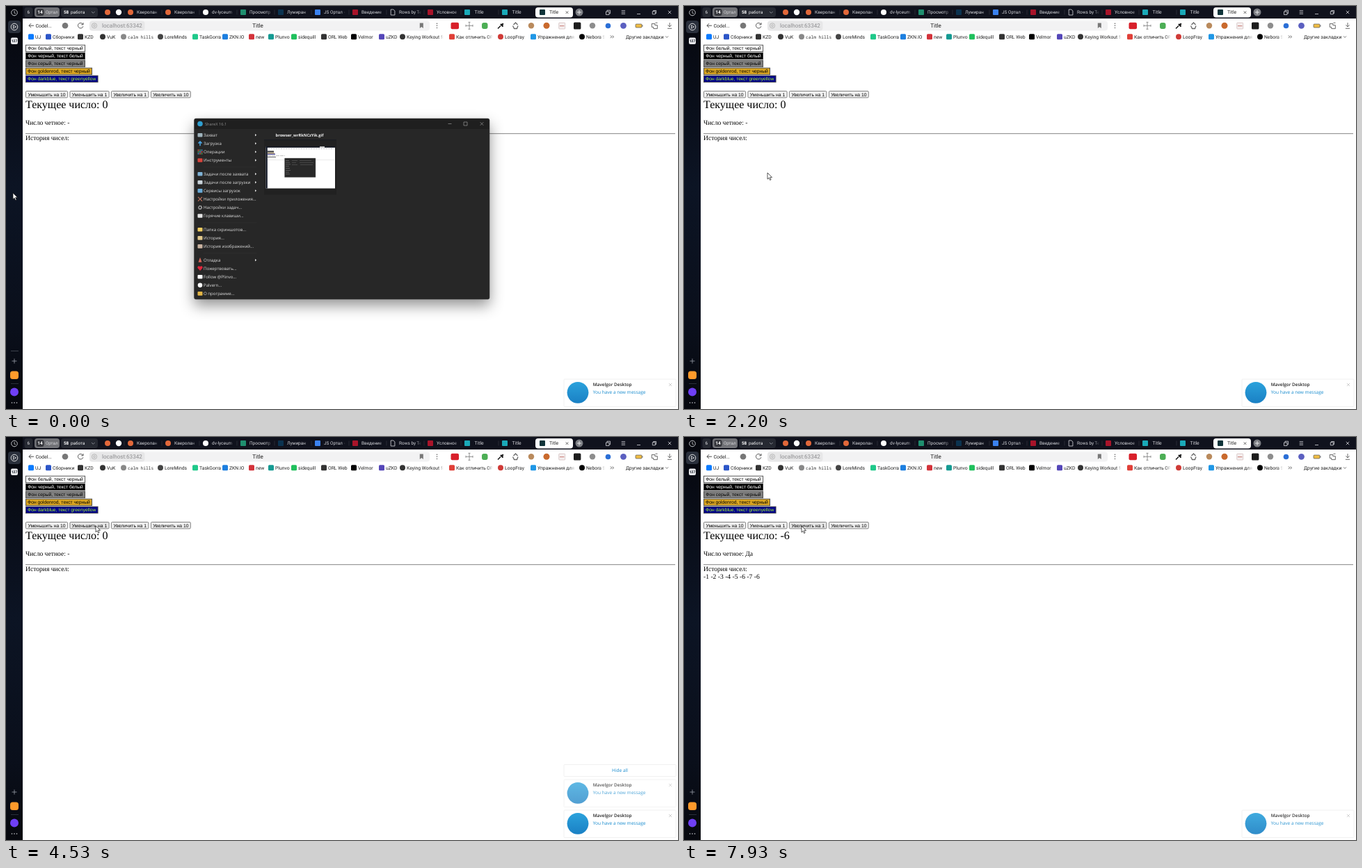
An HTML page that plays this animation: 966 by 580 pixels, repeating every 8 s.

```html
<!DOCTYPE html>
<html lang="ru">
<head>
<meta charset="utf-8">
<title>Title</title>
<style>
html, body { margin: 0; width: 100%; height: 100%; overflow: hidden; background: #fff; }
svg { display: block; width: 100vw; height: 100vh; }
text { text-rendering: geometricPrecision; white-space: pre; }
.ui { font-family: Roboto, sans-serif; }
.os { font-family: "Open Sans", sans-serif; }
.btn { font-family: "Liberation Sans", Arial, sans-serif; }
.page { font-family: "Liberation Serif", "Times New Roman", serif; }
.mono { font-family: "Noto Sans Mono", monospace; }
#win { filter: drop-shadow(0 9px 10px rgba(0, 0, 0, .42)); }
</style>
</head>
<body>
<svg id="stage" viewBox="0 0 966 580" xmlns="http://www.w3.org/2000/svg"></svg>
<script>
const LOOP = 8000;
const BAR = '#10121d';
const stage = document.getElementById('stage');

const rect = (x, y, w, h, fill, r = 0, extra = '') =>
  `<rect x="${x}" y="${y}" width="${w}" height="${h}" rx="${r}" fill="${fill}" ${extra}/>`;
const disc = (x, y, r, fill, extra = '') =>
  `<circle cx="${x}" cy="${y}" r="${r}" fill="${fill}" ${extra}/>`;
const line = (d, color, w = .8, extra = '') =>
  `<path d="${d}" fill="none" stroke="${color}" stroke-width="${w}" ${extra}/>`;
const text = (x, y, s, size, fill, cls = 'ui', extra = '') =>
  `<text x="${x}" y="${y}" font-size="${size}" fill="${fill}" class="${cls}" ${extra}>${s}</text>`;
const cross = (x, y, r, color, w = .8) =>
  line(`M${x - r} ${y - r}l${2 * r} ${2 * r}m0 ${-2 * r}l${-2 * r} ${2 * r}`, color, w);
const mid = 'text-anchor="middle"';

const defs = `<defs>
  <linearGradient id="side" x2="0" y2="1"><stop offset="0" stop-color="#06070d"/>
    <stop offset=".45" stop-color="#0c1424"/><stop offset=".8" stop-color="#0a0f1b"/><stop offset="1" stop-color="#06080e"/></linearGradient>
  <linearGradient id="avatar" x2="0" y2="1"><stop offset="0" stop-color="#2ba2dc"/><stop offset="1" stop-color="#1a80c4"/></linearGradient>
  <linearGradient id="fadeDark"><stop offset="0" stop-color="${BAR}" stop-opacity="0"/><stop offset="1" stop-color="${BAR}"/></linearGradient>
  <linearGradient id="fadeLight"><stop offset="0" stop-color="#fff" stop-opacity="0"/><stop offset="1" stop-color="#fff"/></linearGradient>
</defs>`;

function sidebar() {
  return rect(0, 0, 24, 580, 'url(#side)') +
    disc(12, 9.5, 4.3, 'none', 'stroke="#d5d7dc" stroke-width=".9"') + line('M12 7v3l2 1', '#d5d7dc') +
    rect(3, 21, 18, 18, '#2a303c', 4) +
    disc(12, 30, 4.8, 'none', 'stroke="#eee" stroke-width=".9"') + '<path d="M10.5 27.7l4 2.3l-4 2.3z" fill="none" stroke="#eee" stroke-width=".8"/>' +
    rect(7, 45.5, 10, 9.5, '#e8e9ec', 2) + text(12, 52.3, '127', 5, '#111722', 'ui', mid + ' font-weight="700"') +
    `<g id="sep">${line('M7 496.5h11', '#4a4f5a')}</g>` +
    line('M12 507.5v7m-3.5-3.5h7', '#9a9fa9') +
    rect(6, 525.5, 12, 11.5, '#ff9a2b', 3.5) +
    line('M7 543.5h11', '#343a45') +
    disc(12, 555.5, 6, '#6f3ff5') +
    [8.5, 12, 15.5].map(x => disc(x, 571, .8, '#d5d7dc')).join('');
}

function tabs() {
  const list = [
    [179, '#e2683a', 'Кверолан'], [233, '#e2683a', 'Кверолан'], [287, '#fff', 'dv-lyceum'],
    [341, '#1f8f6f', 'Просмотр'], [395, '#0b3350', 'Лумиран'], [448, '#3b82f0', 'JS Ортал -'],
    [502, '#a8142a', 'Введение'], [556, 'page', 'Rows by Te'], [610, '#a8142a', 'Условное'],
    [663, '#1aa9b8', 'Title'], [717, '#1aa9b8', 'Title']
  ];
  let s = rect(24, 0, 942, 18, BAR) +
    rect(26.5, 2, 12, 14, '#262932', 3) + text(32.3, 11.4, '6', 6.5, '#e6e6e9', 'ui', mid) +
    rect(41, 2, 36, 14, '#717277', 4) + rect(43.5, 4, 11, 10, '#36373d', 3) +
    text(49, 11.3, '14', 6.5, '#fff', 'ui', mid + ' font-weight="700"') + text(57, 11.3, 'Ортал', 6.3, '#d6d6da') +
    rect(79, 2, 53, 14, '#262932', 4) +
    text(86.5, 11.3, '58', 6.3, '#fff', 'ui', mid + ' font-weight="700"') + text(93, 11.3, 'работа', 6.3, '#f3f3f5') +
    line('M123 8l2.3 2.3l2.3-2.3', '#999ca4') +
    disc(146, 9, 4, '#e2683a') + disc(162, 9, 4.2, '#fff');
  for (const [x, color, label] of list) {
    s += line(`M${x - 9} 5.5v7`, '#343843', .7);
    if (color === 'page') s += line(`M${x - 2.8} 5h3.7l2 2v6h-5.7z`, '#d8d9dd');
    else s += color === '#fff' || color === '#e2683a' ? disc(x, 9, 4, color) : rect(x - 4, 5, 8, 8, color, 1);
    const short = label === 'Title';
    s += text(x + (short ? 10.5 : 9), 11.4, label, short ? 6.8 : 6.45, '#d4d5da');
    if (!short) s += rect(x + 34, 3, 7, 12, 'url(#fadeDark)') + rect(x + 41, 3, 3.5, 12, BAR);
  }
  s += rect(761, 2, 54, 14.5, '#fff', 4) + rect(767, 5, 8, 8, '#10343a', 1) +
    text(781, 11.4, 'Title', 6.8, '#222') + cross(806.5, 9.2, 1.8, '#444') +
    disc(824, 9, 5.5, '#7b7d83') + line('M824 6v6m-3-3h6', '#fff') +
    line('M862.5 8h4.5v4.5h-4.5zM864 8v-1.8h4.6v4.6h-1.6', '#d8d9dd') +
    line('M884.7 6.7h5.4m-5.4 2.3h5.4m-5.4 2.3h5.4', '#d8d9dd') +
    line('M907 11.5h5', '#d8d9dd') +
    line('M929.3 7.8h4v4h-4zM930.6 7.8v-1.3h4v4h-1.3', '#d8d9dd') + cross(954, 9, 2.2, '#d8d9dd');
  return s;
}

function toolbar() {
  const dark = '#444';
  return rect(24, 18, 942, 562, '#fff') +
    line('M40 28.2h-7m3-3l-3 3l3 3', '#222') + text(42.5, 30.7, 'Codel...', 7, '#222') +
    disc(85, 28.3, 4.3, '#777') +
    line('M110.6 26.4a3.8 3.8 0 1 0 .3 2.8M111 24v2.8h-2.8', '#333') +
    rect(120, 21.5, 489, 14, '#f2f2f3', 4) + rect(120, 21.5, 79.5, 14, '#e7e7e8', 4) +
    disc(127, 28.3, 3.6, 'none', 'stroke="#aaa" stroke-width=".8"') + disc(127, 28.3, 1.4, 'none', 'stroke="#aaa" stroke-width=".8"') +
    text(138, 31.3, 'localhost:63342', 8.1, '#8b8b8e') +
    text(362, 31.2, 'Title', 8.1, '#222', 'ui', mid) +
    '<path d="M594.8 24.5h5v7.4l-2.5-2l-2.5 2z" fill="#777"/>' +
    [25.2, 28.3, 31.4].map(y => disc(619.5, y, .7, dark)).join('') +
    rect(639.5, 23.8, 11.5, 9.4, '#d81f2a', 2) +
    line('M661 28.3h10m-5-5v10m-5-6.5v3m10-3v3m-6.5-6.5h3m-3 10h3', '#777') +
    rect(684, 24, 8.5, 9, '#4cae55', 3) +
    line('M707 32.5l4-4', '#111', 1.4) + line('M711 26l3.5 3.5m-2-2l2.3-2.3', '#111', 2.2) +
    line('M729.5 27l3-3l3 3m.5 1.5l-1.5 4h-4l-2-4', '#666', 1.3) +
    disc(755, 28.3, 4.2, '#b98a5c') + disc(777, 28.3, 4.5, '#c9692c') +
    rect(794.7, 24, 9, 9, '#f4eeee', 1, 'stroke="#c9b0b0" stroke-width=".6"') + rect(796, 28, 6.4, 1.2, '#cf8a84') +
    rect(816, 23.5, 10.4, 10, '#1c1c1c', 1.5) + disc(843, 28.3, 4.2, '#8d8d8d') +
    disc(865.5, 28.5, 3.8, '#2b6fd6') + disc(887.5, 28.3, 4.4, '#5b5fc0') +
    rect(905, 26, 9, 5, '#f0bd45', 1, 'stroke="#555" stroke-width=".7"') + rect(914.4, 27.4, 1, 2.2, '#555') +
    line('M928.3 25.4h4.5v2.2h3.5v5h-5.5v-2.2h-2.5zM933.5 24.2h3', dark) +
    line('M954 24v5.8m-2.6-2.5l2.6 2.6l2.6-2.6m-5.7 5h6.2', dark);
}

function bookmarks() {
  const list = [
    [36, '#0a7bff', 'UJ'], [61, '#2c56c8', 'Сборники'], [107, '#333', 'KZD'], [139, '#333', 'VuK'],
    [169, '#888', 'calm hills'], [222, '#444', 'LoreMinds'], [272, '#1fc98a', 'TaskGorra'],
    [315, '#1d7fe0', 'ZKN.IO'], [353, '#d3323a', 'new'], [381, '#149a92', 'Plunvo'],
    [414, '#20c05c', 'sidequill'], [457, '#333', 'ORL Web'], [500, '#000', 'Velmor'],
    [540, '#5446b8', 'uZKD'], [570, '#333', 'Keying Workout fo'], [641, '#e04038', 'Как отличить OPU'],
    [711, '#cf3a36', 'LoopFray'], [758, '#1f97e6', 'Упражнения для'], [828, '#000', 'Nebora S']
  ];
  const round = ['VuK', 'calm hills', 'LoreMinds', 'LoopFray', 'Nebora S', 'Keying Workout fo'];
  const cut = { 570: 621, 641: 692, 758: 810, 828: 853 };
  let s = '';
  for (const [x, color, label] of list) {
    s += round.includes(label) ? disc(x, 44.3, 4, color) : rect(x - 4, 40.3, 8, 8, color, 1.5);
    s += label === 'calm hills' ? text(175, 46.8, label, 6.2, '#333', 'mono')
      : text(x + 6, 46.8, label, 6.8, '#222');
    if (cut[x]) s += rect(cut[x], 39, 8, 11, 'url(#fadeLight)') + rect(cut[x] + 8, 39, 7, 11, '#fff');
  }
  return s + line('M869 42.5l1.8 1.8l-1.8 1.8m2.7-3.6l1.8 1.8l-1.8 1.8', '#333') +
    text(891, 46.8, 'Другие закладки', 6.8, '#222') + line('M948 43.4l2 2l2-2', '#555');
}

function page() {
  const themes = [
    ['белый, текст черный', '#fff', '#000', 86], ['черный, текст белый', '#000', '#fff', 86],
    ['серый, текст черный', '#808080', '#000', 86], ['goldenrod, текст черный', '#daa520', '#000', 96],
    ['darkblue, текст greenyellow', '#00008b', '#adff2f', 104.5]
  ];
  const steps = [['Уменьшить на 10', 28, 61], ['Уменьшить на 1', 91.5, 57], ['Увеличить на 1', 151, 54.3], ['Увеличить на 10', 208, 57.7]];
  const edge = 'stroke="#444" stroke-width=".9"';
  return themes.map(([name, bg, fg, w], i) =>
    rect(28.45, 56.2 + 11 * i, w - .9, 9.5, bg, 0, edge) +
    text(28 + w / 2, 63.3 + 11 * i, 'Фон ' + name, 6.75, fg, 'btn', mid)).join('') +
    steps.map(([name, x, w], i) =>
      rect(x + .4, 122.5, w - .8, 9.4, '#efefef', 1.3, `stroke="#666" stroke-width=".8" id="step${i}"`) +
      text(x + w / 2, 129.6, name, 6.75, '#000', 'btn', mid)).join('') +
    text(28, 147, '', 16, '#000', 'page', 'id="now"') +
    text(28, 170.5, '', 9.6, '#000', 'page', 'id="even"') +
    rect(28, 183, 934, 1, '#9a9a9a') + rect(28, 184, 934, .5, '#d0d0d0') +
    text(28, 193, 'История чисел:', 9.6, '#000', 'page') +
    text(28, 204.2, '', 9.6, '#000', 'page', 'id="history"');
}

function appWindow() {
  // label, icon colour, submenu flag; null marks a gap between groups
  const menu = [
    ['Захват', '#9fb4bd', 1], ['Загрузка', '#4aa3e0', 1], ['Операции', '#5f9bd0', 1], ['Инструменты', '#d8443c', 1], null,
    ['Задачи после захвата', '#7fb2d6', 1], ['Задачи после загрузки', '#c9d3da', 1], ['Сервисы загрузок', '#69a9d6', 1],
    ['Настройки приложения...', '#b5584a'], ['Настройки задач...', '#c8c8c8'], ['Горячие клавиши...', '#e4e4e4'], null,
    ['Папка скриншотов...', '#f0cd62'], ['История...', '#e0c78c'], ['История изображений...', '#c9b2a0'], null,
    ['Отладка', '#d9675a', 1], ['Пожертвовать...', '#e0263c'], ['Follow @Plinvo...', '#fff'], ['Palvern...', '#fff'], ['О программе...', '#e3b545']
  ];
  const icons = {
    'Загрузка': y => line(`M279 ${y + 3.5}v-6m-2.5 2.3l2.5-2.5l2.5 2.5`, '#4aa3e0', 1.6),
    'Операции': y => [0, 1, 2].map(r => [0, 1, 2].map(c =>
      rect(275.6 + 2.5 * c, y - 3.3 + 2.5 * r, 1.8, 1.8, ['#d9534a', '#4fa65a', '#4a8fd0'][(r + c) % 3])).join('')).join(''),
    'Настройки приложения...': y => cross(279, y, 3, '#c0745f', 1.2),
    'Настройки задач...': y => disc(279, y, 2.2, 'none', 'stroke="#ccc" stroke-width="1.5" stroke-dasharray="1.2 .5"'),
    'Отладка': y => `<path d="M279 ${y - 4}l2.5 7h-5z" fill="#d9675a"/>`,
    'Пожертвовать...': y => `<path d="M279 ${y + 3.3}l-3.4-3.8a1.9 1.9 0 0 1 3.4-2a1.9 1.9 0 0 1 3.4 2z" fill="#e0263c"/>`,
    'Palvern...': y => disc(279, y, 3.3, '#fff')
  };
  let s = rect(270.5, 162, 424.5, 260, '#272727', 2.5, 'stroke="#3b3b3b" stroke-width=".6"') +
    `<path d="M271 177v-12.5a2.2 2.2 0 0 1 2.2-2.2h419a2.2 2.2 0 0 1 2.2 2.2v12.5z" fill="#1f1f1f"/>` +
    disc(279, 169.5, 3.8, '#2f9fd0') + text(286, 171.7, 'ShareX 16.1', 5.7, '#8e8e8e', 'os') +
    line('M635.5 169.5h5', '#999', .7) + line('M658 167h5v5h-5z', '#999', .7) + cross(684, 169.5, 2.3, '#999', .7);
  let y = 185.8;
  for (const item of menu) {
    if (!item) {
      s += line(`M284 ${y - 2.2}h76`, '#333', .6);
      y += 7.7;
      continue;
    }
    const [label, color, sub] = item;
    s += icons[label] ? icons[label](y) : rect(275.5, y - 2.8, 7, 5.6, color, 1);
    s += text(284, y + 2.2, label, 6.1, '#dedede', 'os');
    if (sub) s += `<path d="M358 ${y - 1.7}l2.2 1.7l-2.2 1.7z" fill="#e0e0e0"/>`;
    y += 12.06;
  }
  return s + text(422, 188.1, 'browser_wrRkNCzYik.gif', 5.7, '#f0f0f0', 'os', mid + ' font-weight="700"') +
    rect(371, 192.5, 104, 79, '#212121') + line('M371 192.8h104', '#171c25', .8) +
    rect(373.5, 202, 99.5, 60.5, '#fff') + rect(373.5, 202, 99.5, 1.8, '#11151f') + rect(373.5, 202, 2.3, 60.5, '#101623') +
    line('M377 205.4h94', '#b9bcc2', .9, 'stroke-dasharray="2 1.6"') + rect(451, 202.2, 7, 1.6, '#e9e9e9') +
    rect(376, 208, 9, 1, '#999') + rect(376, 209.2, 9, 1.2, '#111') + rect(376, 210.4, 9, 1, '#777') +
    rect(376, 211.5, 10, 1, '#caa23a') + rect(376, 212.6, 11, 1.1, '#10107a') +
    line('M376 215.5h25', '#b5b5b5', .8, 'stroke-dasharray="5 1"') + line('M376 217.4h12', '#555', .9) +
    line('M376 221.5h96', '#ccc', .4) +
    rect(400.5, 219, 44.5, 27.5, '#282828', .5, 'stroke="#777" stroke-width=".4"') +
    [0, 1, 2, 3, 4, 5, 6, 7].map(i => rect(402, 222 + 2.8 * i, 5 + i % 3, .6, '#777')).join('') +
    line('M411 222.5h8m3 0h17m-28 3h6m5 0h20m-31 3h8m4 0h18', '#666', .5);
}

function toast(id) {
  return `<g id="${id}">` + rect(802, 537, 161, 39.5, '#fff', 1, 'stroke="#ededed" stroke-width=".8"') +
    disc(822, 556.3, 15.4, 'url(#avatar)') +
    text(843.7, 546.9, 'Mavelgor Desktop', 6.4, '#222', 'os', 'font-weight="600"') +
    text(843.7, 558.2, 'You have a new message', 6.54, '#168acd', 'os') +
    cross(955, 545, 2.1, '#bbb', .7) + '</g>';
}

stage.innerHTML = defs + toolbar() + bookmarks() + page() + sidebar() + tabs() +
  `<g id="win">${appWindow()}</g>` + toast('older') + toast('newer') +
  `<g id="hide">${rect(802, 471.5, 161, 17, '#fff', 1, 'stroke="#ededed" stroke-width=".8"')}` +
  text(882.5, 482.3, 'Hide all', 6.54, '#168acd', 'os', mid) + '</g>' +
  '<path id="cursor" d="M0 0v9.2l2.1-1.9l1.5 3.3l1.5-.7l-1.5-3.2h2.9z" fill="#fff" stroke="#111" stroke-width=".7" stroke-linejoin="round"/>';

const $ = id => document.getElementById(id);
const clamp = v => Math.max(0, Math.min(1, v));
const ramp = (t, from, span) => clamp((t - from) / span);
const smooth = p => p * p * (3 - 2 * p);
const slowHide = (t, from) => Math.sqrt(1 - ramp(t, from, 4000) ** 2);

// time, x, y of the pointer tip
const path = [
  [0, 10, 269], [60, 10, 269], [400, 75, 208], [650, 75, 208], [730, 75, 206], [1300, 75, 206],
  [1730, 109, 194], [1850, 109, 195], [2130, 120, 240], [2300, 120, 240], [2720, 124, 205],
  [3200, 127, 150], [3530, 129, 131], [3660, 129, 127.6], [6720, 129, 127.6], [7330, 165, 128], [7500, 169, 128]
];
const clicks = [[4870, -1], [5200, -2], [5470, -3], [5770, -4], [6070, -5], [6330, -6], [6600, -7], [7700, -6]];

function pointer(t) {
  const i = path.findIndex(p => p[0] > t);
  if (i < 0) return path[path.length - 1].slice(1);
  const [t0, x0, y0] = path[i - 1], [t1, x1, y1] = path[i];
  const p = smooth((t - t0) / (t1 - t0));
  return [x0 + (x1 - x0) * p, y0 + (y1 - y0) * p];
}

function draw(t) {
  const [x, y] = pointer(t);
  $('cursor').setAttribute('transform', `translate(${x} ${y})`);
  $('sep').setAttribute('opacity', 1 - ramp(t, 100, 250));
  $('win').style.display = t < 2200 ? '' : 'none';

  const past = clicks.filter(c => c[0] <= t).map(c => c[1]);
  const n = past.length ? past[past.length - 1] : 0;
  $('now').textContent = 'Текущее число: ' + n;
  $('even').textContent = 'Число четное: ' + (past.length ? (n % 2 ? 'Нет' : 'Да') : '-');
  $('history').textContent = past.join(' ');
  const onRow = y > 122 && y < 132;
  $('step1').setAttribute('fill', onRow && x > 91 && x < 149 ? '#e5e5e5' : '#efefef');
  $('step2').setAttribute('fill', onRow && x > 151 && x < 206 ? '#e5e5e5' : '#efefef');

  const arrive = ramp(t, 2950, 150);
  $('older').setAttribute('transform', `translate(0 ${-44 * arrive})`);
  $('older').setAttribute('opacity', slowHide(t, 1900));
  $('newer').setAttribute('opacity', arrive * slowHide(t, 6200));
  $('hide').setAttribute('opacity', arrive * (1 - ramp(t, 5780, 150)));
}

let start;
function tick(now) {
  if (start === undefined) start = now;
  draw((now - start) % LOOP);
  requestAnimationFrame(tick);
}
draw(0);
requestAnimationFrame(tick);
</script>
</body>
</html>
```
